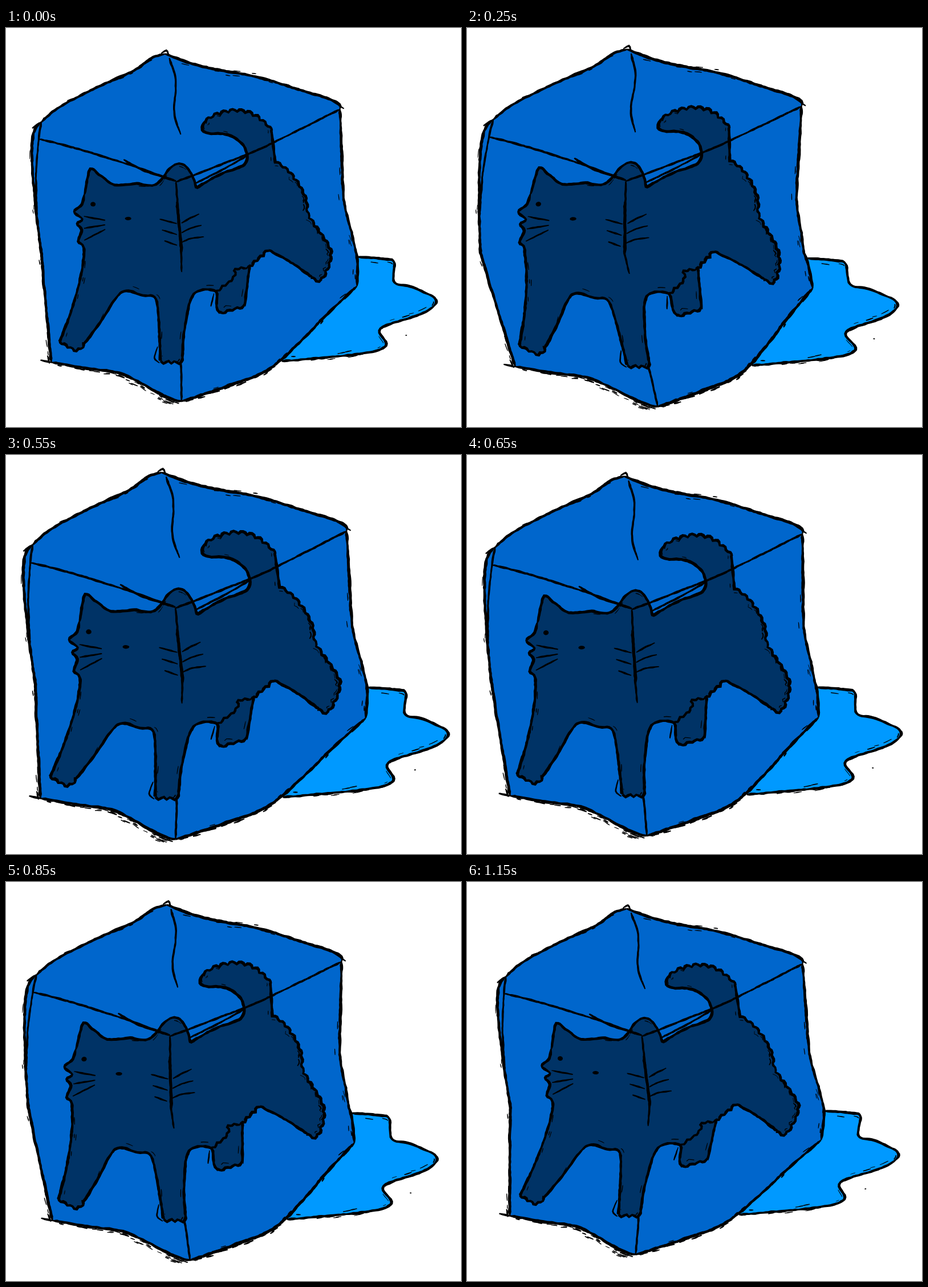
Animation, 798 px wide and 701 px high, one loop 1200 ms. Source, as an HTML page:

```html
<!DOCTYPE html>
<html lang="en">
<head>
<meta charset="utf-8">
<title>Cat in an ice cube</title>
<style>
html, body { margin: 0; width: 100%; height: 100%; overflow: hidden; background: #fff; }
svg { display: block; width: 100%; height: 100%; }
</style>
</head>
<body>
<svg id="stage" viewBox="0 0 798 701"></svg>
<script>
const STEP = 50, FRAMES = 24;
const TOP = 45, MID = 392, LOW = 657, AXIS = 320;
const svg = document.getElementById('stage');
const parts = [];

let seed = 7;
function rnd() {
  seed = (seed * 16807) % 2147483647;
  return seed / 2147483647;
}

// Smooth curve through a few points, sampled every 4 pixels
function curve(text) {
  const p = text.split(/\s+/).map(s => s.split(',').map(Number)), out = [];
  for (let i = 0; i < p.length - 1; i++) {
    const a = p[Math.max(i - 1, 0)], b = p[i], c = p[i + 1], d = p[Math.min(i + 2, p.length - 1)];
    const n = Math.max(2, Math.ceil(Math.hypot(c[0] - b[0], c[1] - b[1]) / 4));
    for (let j = 0; j < n; j++) {
      const t = j / n;
      out.push([0, 1].map(k => b[k] + 0.5 * t * (c[k] - a[k] +
        t * (2 * a[k] - 5 * b[k] + 4 * c[k] - d[k] + t * (3 * (b[k] - c[k]) + d[k] - a[k])))));
    }
  }
  return out.concat([p[p.length - 1]]);
}

function normal(line, i) {
  const a = line[Math.max(i - 1, 0)], b = line[Math.min(i + 1, line.length - 1)];
  const dx = b[0] - a[0], dy = b[1] - a[1], l = Math.hypot(dx, dy) || 1;
  return [dy / l, -dx / l];
}

const shift = (p, n, d) => [p[0] + n[0] * d, p[1] + n[1] * d];

// Row of round bumps, used for fur and toes
function bumps(text, wave, amp) {
  const line = curve(text);
  let run = 0;
  return line.map((p, i) => {
    if (i) run += Math.hypot(p[0] - line[i - 1][0], p[1] - line[i - 1][1]);
    return shift(p, normal(line, i), amp * (Math.abs(Math.sin(Math.PI * run / wave)) - 0.4));
  });
}

function shape(points, fill) {
  const el = document.createElementNS('http://www.w3.org/2000/svg', 'path');
  el.setAttribute('fill', fill);
  svg.appendChild(el);
  parts.push({ el, points });
}

// Rough ink line of uneven width with narrowed ends
function ink(line, width) {
  const left = [], right = [];
  let u = 0.5, v = 0.5;
  line.forEach((p, i) => {
    const n = normal(line, i);
    const w = width * Math.min(1, 0.5 + Math.min(i, line.length - 1 - i) / 6);
    u = (u + rnd()) / 2;
    v = (v + rnd()) / 2;
    left.push(shift(p, n, w * (0.25 + 0.5 * u)));
    right.unshift(shift(p, n, -w * (0.25 + 0.5 * v)));
  });
  shape(left.concat(right), '#000');
}

const lines = (width, ...texts) => texts.forEach(t => ink(curve(t), width));

// Short loose strokes beside a line, between two distances from it
function specks(line, count, near, far, size) {
  for (let k = 0; k < count; k++) {
    const i = Math.floor(rnd() * (line.length - 5));
    const d = near + rnd() * (far - near), tilt = rnd() - 0.5;
    const n = normal(line, i);
    const bit = line.slice(i, i + 3 + Math.floor(rnd() * 2));
    ink(bit.map((p, j) => shift(p, n, d + tilt * j)), size * (0.6 + 0.6 * rnd()));
  }
}

function dot(x, y, rx, ry) {
  const ring = [];
  for (let a = 0; a < 6.28; a += 0.4) ring.push([x + rx * Math.cos(a), y + ry * Math.sin(a)]);
  shape(ring, '#000');
}

const roof = curve('279,46 345,68 437,86 515,109 578,130 584,142');
const rightSide = curve('584,142 587,240 590,305 604,365 613,410 613,453');
const rightBase = curve('613,453 565,500 470,595 385,632 312,657');
const leftBase = curve('312,657 285,649 210,610 150,599 83,588');
const leftSide = curve('83,588 67,450 61,392 53,325 46,230 50,182 63,165');
const leftRoof = curve('63,165 95,139 160,105 225,75 255,54 279,46');
const cube = [roof, rightSide, rightBase, leftBase, leftSide, leftRoof];

const pool = curve('611,401 660,405 677,411 678,446 710,455 752,478 725,503 656,528 666,558 620,573 485,586');

const back = bumps('470,235 497,255 521,295 528,330 561,380 565,408 550,441 534,437', 15, 4);
const cat = [].concat(
  curve('137,292 145,252 151,247 163,257 190,275 225,273 262,274 288,245 306,238 322,252 333,280'),
  curve('333,280 375,256 418,238 416,208 390,188 350,184 343,174 348,164'),
  bumps('348,164 378,149 412,146 442,158 464,180', 15, 5),
  curve('464,180 470,235'),
  back,
  curve('534,437 500,413 458,389'),
  bumps('458,389 425,420', 13, -5),
  curve('425,420 418,488'),
  bumps('418,488 375,500', 15, 4),
  curve('375,500 369,490 367,462 329,467 314,530 312,584'),
  bumps('312,586 273,586', 13, 7),
  curve('273,586 270,530 263,476 240,470 203,464 165,520 140,555'),
  bumps('140,555 126,565 97,550', 13, 5),
  curve('97,550 115,500 132,430 135,385 126,374 132,354 124,343 133,335 119,322 133,309 137,292')
);

shape(pool, '#0099ff');
shape(cube.flat(), '#0066cc');
shape(cat, '#003366');

ink(pool, 4.4);
specks(pool, 13, -8, -3, 2.4);
specks(pool.slice(-45), 8, 1, 4, 2.4);

cube.forEach(edge => ink(edge, 4.8));
specks(roof, 12, -7, 5, 2.6);
specks(rightSide, 7, -9, -4, 2.4);
specks(rightBase, 24, -4, 3, 3);
specks(rightBase.slice(-50), 26, 0, 5, 3.4);
specks(leftBase, 30, 0, 5, 3.2);
specks(leftBase.slice(0, 32), 12, 4, 11, 2.6);
specks(leftSide, 12, 0, 5, 2.2);
specks(leftRoof, 14, -3, 3, 3);
lines(4, '273,45 282,40 286,48', '582,136 591,142', '64,584 84,588', '76,576 80,590', '47,176 57,168');

// Edges seen through the ice
lines(3.6,
  '58,195 115,209 210,238 297,269',
  '206,231 243,251 297,268',
  '297,270 380,238 455,207 584,143',
  '330,273 375,250 420,225',
  '287,53 298,95 295,150 306,187',
  '297,270 302,345 307,428',
  '309,585 312,657',
  '63,165 58,195 53,260 54,328');
lines(4.6, '298,305 302,345 306,393');

ink(cat, 4.8);
specks(cat, 30, -9, -3, 2.2);
specks(back, 14, -7, -3, 2.6);
ink(bumps('368,462 397,437 400,423 425,419', 13, -4), 4.2);
lines(3, '268,560 263,580 272,589', '364,466 359,489');

// Whiskers fan out row by row, eyes sit above
for (let i = 0; i < 3; i++) {
  const y = 330 + 21 * i, tip = 334 + 11 * i;
  lines(3, `136,${y} 173,${tip + 3 * (1 - i)}`,
    `${268 + 4 * i},${y + 5 - 2 * i} 298,${343 + 19 * i}`,
    `306,${342 + 17 * i} 322,${333 + 18 * i} ${337 + 4 * i},${326 + 20 * i}`);
}
dot(152, 309, 4.5, 4);
dot(213, 334, 5.5, 3);
dot(701, 540, 1.5, 1);

const mix = (a, b, t) => a + (b - a) * t;

// The cube swells three times a loop while its waist sways against its base
function poseAt(step) {
  const turn = 2 * Math.PI / FRAMES;
  const a = turn * (step - 3);
  const swell = (1 + Math.cos(3 * turn * (step - 3.2))) / 2;
  const sway = -23 * Math.cos(2 * a - 0.25) - 5.7 * Math.cos(a - 0.36);
  const bob = 4 - 3 * Math.cos(turn * step);
  return {
    grow: 0.058 * swell,
    x: [3 + 3 * Math.sin(2 * a) - 5 * swell, sway - 12 * swell, 4 * swell - 1 - sway],
    y: [1 - 16.5 * swell, bob, bob - 3.5 + 15 * swell]
  };
}

function warp([px, py], { grow, x, y }) {
  const row = py < MID ? 0 : 1;
  const t = row ? (py - MID) / (LOW - MID) : (py - TOP) / (MID - TOP);
  const dx = grow * (px - AXIS) + mix(x[row], x[row + 1], t);
  return (px + dx).toFixed(1) + ' ' + (py + mix(y[row], y[row + 1], t)).toFixed(1);
}

let shown = -1;
function draw(now) {
  const step = Math.floor(now / STEP) % FRAMES;
  if (step === shown) return;
  shown = step;
  const pose = poseAt(step);
  for (const { el, points } of parts) {
    el.setAttribute('d', 'M' + points.map(p => warp(p, pose)).join('L') + 'Z');
  }
}

let start = null;
function tick(now) {
  if (start === null) start = now;
  draw(now - start);
  requestAnimationFrame(tick);
}
draw(0);
requestAnimationFrame(tick);
</script>
</body>
</html>
```
